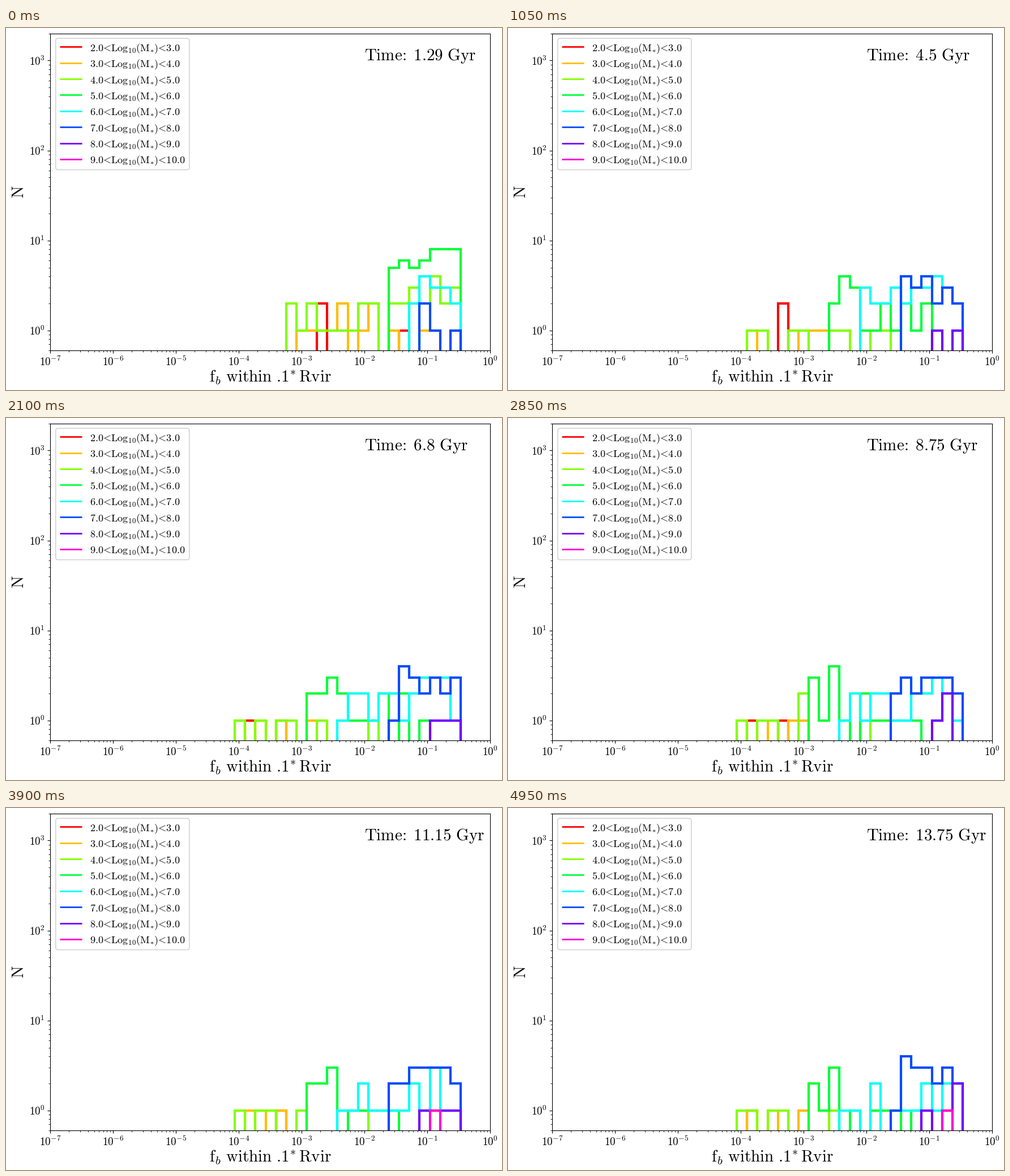
Animation of 876 by 640 pixels, one loop 5100 ms. Source, as a matplotlib script:

```python
import numpy as np
import matplotlib.pyplot as plt
from matplotlib.animation import FuncAnimation
from matplotlib.patches import FancyBboxPatch
from matplotlib.ticker import LogLocator

W, H, DPI = 876, 640, 100
STEPS, INTERVAL = 34, 150
NBINS = 49
EDGES = np.logspace(-7, 1, NBINS + 1)
COLORS = [plt.cm.hsv(i / 8) for i in range(8)]
BIG, TICK, LEGEND = 20.9, 13.6, 13.1
TOP_BIN = 39.8   # upper end of every class at the start
SETTLE = 5       # steps in which the gas loss settles

# Per mass class: size at the start, once settled and at the end;
# low and median bin at the start; low, median and high bin later
CLASSES = [
    ((3, 2, 1), (26, 26.9), (19, 20.5, 22)),
    ((15, 4, 3), (24, 31), (18, 21.5, 25)),
    ((31, 8, 6), (23, 34.5), (18, 22.5, 34)),
    ((46, 20, 11), (33, 37.3), (25, 28, 36.5)),
    ((14, 28, 12), (35.2, 37.3), (28, 35, 39.5)),
    ((4, 18, 18), (36, 37), (33.5, 36.5, 39.8)),
    ((0, 2, 4), (36, 37), (36.5, 38.5, 40)),
    ((0, 0, 1), (37, 38), (37, 38, 39)),
]

plt.rcParams.update({"mathtext.fontset": "cm", "mathtext.default": "rm"})
rng = np.random.default_rng(4)
phases = rng.uniform(0, 2 * np.pi, (len(CLASSES), 60))
speeds = rng.uniform(0.1, 0.5, phases.shape)


def tally(m, i):
    """Count the galaxies of class m per bin at step i."""
    sizes, early, late = CLASSES[m]
    n = int(round(np.interp(i, (0, SETTLE, STEPS - 1), sizes)))
    if n == 0:
        return np.zeros(NBINS)
    w = 1 - np.exp(-i / SETTLE)
    spread = (1 - w) * np.array([*early, TOP_BIN]) + w * np.array(late)
    # Evenly ranked galaxies, each wandering around its rank
    wander = 0.5 * np.sin(phases[m, :n] + speeds[m, :n] * i)
    rank = (np.arange(n) + 0.5 + wander) / n
    bins = np.interp(rank, (0, 0.5, 1), spread).astype(int)
    return np.bincount(bins, minlength=NBINS)


def age(i):
    gyr = np.interp(i, (0, 3, 7, 14, 19, 26, 33),
                    (1.29, 2.55, 4.5, 6.8, 8.75, 11.15, 13.75))
    return round(round(gyr * 20) / 20 if i else gyr, 2)


fig = plt.figure(figsize=(W / DPI, H / DPI), dpi=DPI, facecolor="white")
ax = fig.add_axes([78 / W, 70 / H, 777 / W, 560.4 / H])
ax.set(xscale="log", yscale="log", xlim=(1e-7, 1), ylim=(0.6, 2000))
for axis in (ax.xaxis, ax.yaxis):
    axis.set_major_locator(LogLocator(numticks=20))
    axis.set_minor_locator(LogLocator(subs=range(2, 10), numticks=20))
    axis.set_major_formatter(
        lambda v, pos: r"$10^{%d}$" % round(np.log10(v)))
ax.tick_params(labelsize=TICK)

# Overlay measured in pixels from the top left
page = fig.add_axes([0, 0, 1, 1])
page.set(xlim=(0, W), ylim=(H, 0))
page.axis("off")
page.text(467, 626, r"$f_{\mathit{b}}\ \text{within}\ \text{.1}^{\ast}\,"
          r"\text{Rvir}$", size=BIG, ha="center", va="baseline")
page.text(31, 290, r"$N$", size=BIG, rotation=90, ha="center",
          va="baseline", rotation_mode="anchor")

page.add_patch(FancyBboxPatch((87.8, 18.3), 236, 232.3, fc="white", ec="0.8",
                              lw=1, boxstyle="round,pad=0,rounding_size=3.9"))
for m, color in enumerate(COLORS):
    y = 33.4 + 28.36 * m
    page.plot([95, 134], [y, y], color=color, lw=2, solid_capstyle="butt")
    label = r"$\text{%.1f<Lo}g_{10}(M_{*})\text{<%.1f}$" % (m + 2, m + 3)
    page.text(148.3, y + 7.6, label, size=LEGEND, va="baseline")

outlines = [ax.plot(np.repeat(EDGES, 2), np.full(2 * NBINS + 2, 0.01),
                    color=c, lw=3, solid_joinstyle="miter")[0]
            for c in COLORS]
clock = ax.text(0.01, 1000, "", size=BIG, va="baseline")


def draw(i):
    for m, line in enumerate(outlines):
        tops = np.repeat(np.maximum(tally(m, i), 0.01), 2)
        line.set_ydata(np.concatenate([[0.01], tops, [0.01]]))
    clock.set_text(r"$\text{Time:}\ \,\text{%g}\ \text{Gyr}$" % age(i))
    return outlines + [clock]


anim = FuncAnimation(fig, draw, frames=STEPS, interval=INTERVAL, repeat=True)
plt.show()
```
